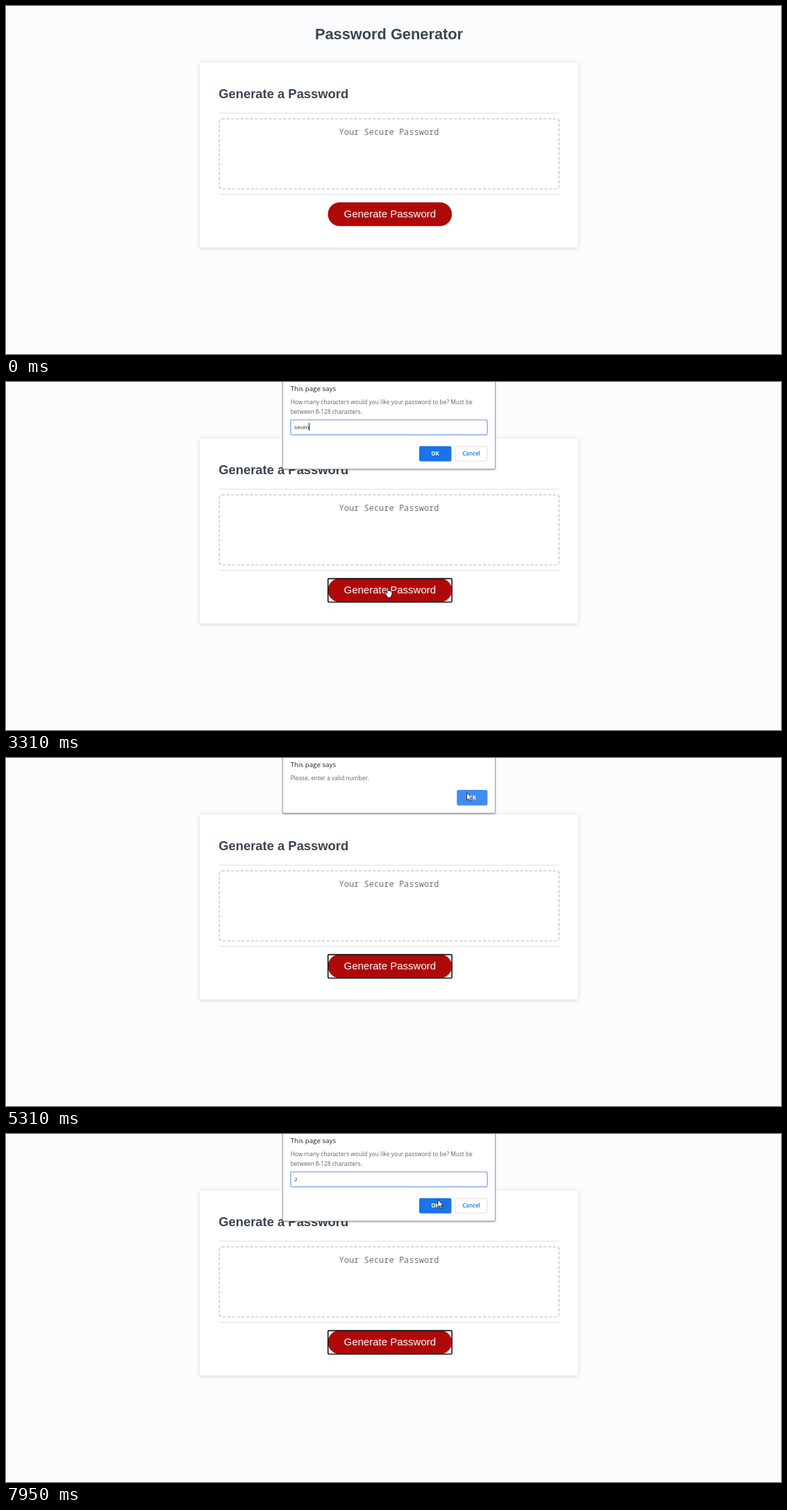
An HTML page that plays this animation: 1116x502 px, repeating every 8 s.

```html
<!DOCTYPE html>
<html lang="en">
<head>
<meta charset="utf-8">
<title>Password Generator</title>
<style>
  html, body { margin: 0; width: 100%; height: 100%; overflow: hidden; background: #fafcfe; }
  svg { display: block; width: 100%; height: 100%; }
  .page { font-family: "Liberation Sans", Arial, sans-serif; fill: #3b4550; }
  .page .head { font-weight: bold; }
  .dialog { font-family: "Open Sans", "Noto Sans", sans-serif; font-size: 8.4px; fill: #5f6368; }
  .dialog .title { font-size: 9.75px; fill: #202124; }
  .dialog .btn { font-size: 8px; font-weight: 600; text-anchor: middle; }
  .mid { text-anchor: middle; }
  .card { filter: drop-shadow(0 1.4px 2.7px rgba(0, 0, 0, .16)); }
  .panel { fill: #fff; stroke: #a4a7aa; filter: drop-shadow(0 1px 1.2px rgba(0, 0, 0, .35)); }
</style>
</head>
<body>
<svg viewBox="0 0 1116 502" xmlns="http://www.w3.org/2000/svg">
  <rect width="1116" height="502" fill="#fafcfe"/>
  <g class="page">
    <text class="head mid" x="551.5" y="47.8" font-size="21.8">Password Generator</text>
    <rect class="card" x="279" y="81.5" width="545" height="267" rx="3.4" fill="#fff"/>
    <text class="head" x="306.2" y="133.3" font-size="18.4">Generate a Password</text>
    <path d="M306.5 154.5H797M306.5 271.5H797" stroke="#e1e3e5" stroke-width="1.2"/>
    <rect x="307.1" y="162.9" width="489.2" height="101" rx="3.4" fill="none"
          stroke="#c3c5c7" stroke-width="1.4" stroke-dasharray="4.1 2.72"/>
    <text class="mid" x="551.5" y="186" font-size="12" fill="#757575"
          style="font-family:'Noto Sans Mono','DejaVu Sans Mono',monospace">Your Secure Password</text>
    <rect x="463.5" y="283.2" width="178.6" height="34.4" rx="17.2" fill="#af0808"/>
    <text class="mid" x="552.8" y="305.2" font-size="15" fill="#fff">Generate Password</text>
  </g>
  <rect id="ring" x="463.7" y="283.6" width="178.4" height="33.9" rx="1.5" fill="none" stroke="#101010" stroke-width="1.6"/>

  <g id="alert" class="dialog">
    <rect class="panel" x="398.5" y="-40" width="306" height="119.5" rx="1.5"/>
    <text class="title" x="409.7" y="13">This page says</text>
    <text x="409.7" y="32">Please, enter a valid number.</text>
    <rect x="649.2" y="46" width="44.2" height="22.4" rx="2.4" fill="#428cf0"/>
    <text class="btn" x="671.2" y="60" fill="#fff" style="font-weight:700">OK</text>
  </g>

  <g id="prompt" class="dialog">
    <rect class="panel" x="398.5" y="-40" width="306" height="165.5" rx="1.5"/>
    <text class="title" x="409.7" y="13">This page says</text>
    <text x="409.7" y="32">How many characters would you like your password to be? Must be</text>
    <text x="409.7" y="45.5">between 8-128 characters.</text>
    <rect x="409.9" y="54.6" width="283.2" height="21.6" rx="1.6" fill="#fff" stroke="#80abec" stroke-width="1.4"/>
    <text id="entry" x="415.2" y="68" style="font-size:7.9px;fill:#303134"></text>
    <rect id="caret" y="59" width="1" height="11" fill="#202124"/>
    <rect x="595" y="92.6" width="46.4" height="22" rx="2.4" fill="#1a73e8"/>
    <text class="btn" x="618" y="106.2" fill="#fff" style="font-weight:700">OK</text>
    <rect x="647" y="93" width="46" height="21.2" rx="2.4" fill="#fff" stroke="#dadce0"/>
    <text class="btn" x="670" y="106.2" fill="#1a73e8">Cancel</text>
  </g>

  <circle id="click" r="8.3" fill="#d99a00" fill-opacity=".82"/>
  <g id="pointer" stroke-linejoin="round" stroke-linecap="round">
    <path id="arrow" d="M0 0V10.6L2.5 8.4 4.3 12.6 6 11.9 4.2 7.8H7.5Z" fill="#fff" stroke="#111" stroke-width=".8"/>
    <path id="hand" d="M-.9 .9Q0-.7 .9 .9V4.8Q1.9 4 2.7 5.1 3.8 4.4 4.5 5.5 6 4.9 6.3 6.7V9.5Q6.2 11.6 4.9 12.7V14.7H-.4V13.2Q-2.8 10.6-3.7 8.3-3.5 6.5-2 7.4L-.9 8.7Z" fill="#fff" stroke="#111" stroke-width=".9"/>
    <path id="beam" d="M-2-5.5H-.6L0-5 .6-5.5H2M0-5V5M-2 5.5H-.6L0 5 .6 5.5H2" fill="none" stroke="#333" stroke-width="1"/>
  </g>
</svg>
<script>
const LOOP = 8000;
const el = {};
for (const node of document.querySelectorAll('[id]')) el[node.id] = node;

// [start ms, opacity, lift]
const poses = {
  prompt: [[0, 0, 0], [1370, .12, 1.2], [1450, .4, .9], [1540, .8, .4], [1620, 1, 0],
    [3850, .8, .9], [3940, .25, 1.2], [4020, 0, 0],
    [5890, .35, 1], [6010, .85, .3], [6060, 1, 0]],
  alert: [[0, 0, 0], [3850, .35, 1], [3940, .85, .3], [4020, 1, 0],
    [5815, .95, .4], [5890, .8, .95], [6010, .25, 1.2], [6060, 0, 0]]
};
// [start ms, typed text, caret visible]
const typing = [[0, '', 1], [1940, '', 0], [2460, 's', 1], [2700, 'se', 1], [2940, 'sev', 1],
  [3090, 'seve', 1], [3310, 'seven', 1], [5000, '', 1], [6290, '', 0], [6820, '', 1],
  [6990, '2', 1], [7520, '2', 0]];

const current = (list, t) => list.filter(k => k[0] <= t).pop();
const within = (t, a, b) => t >= a && t < b;
const show = (node, on) => node.setAttribute('visibility', on ? 'visible' : 'hidden');
const place = (node, [x, y]) => node.setAttribute('transform', `translate(${x} ${y})`);
const smooth = p => p * p * (3 - 2 * p);

// Progress in equal held steps between two times.
function stepped(t, from, to, gaps, first) {
  const k = Math.floor((t - from) / (to - from) * gaps + 1e-6) + first;
  return Math.max(0, Math.min(1, k / (gaps + first)));
}

function curve(p, a, b, c) {
  const q = 1 - p;
  return [0, 1].map(i => q * q * a[i] + 2 * p * q * b[i] + p * p * c[i]);
}

function pointerAt(t) {
  if (t < 4650) {
    const pos = curve(smooth(stepped(t, 290, 770, 6, 0)), [1041, 483], [790, 340], [549.5, 296.3]);
    return { pos, kind: pos[0] < 642 && pos[1] < 318 ? 'hand' : 'arrow' };
  }
  if (t < 5890) {
    const p = smooth(stepped(t, 4650, 5440, 10, 1));
    return { pos: curve(p, [549.5, 296.3], [640, -12], [669, 60]), kind: 'arrow' };
  }
  const p = t < 7606 ? 0 : smooth(stepped(t, 7606, 7950, 4, 1));
  const pos = curve(p, [669, 60], [640, 117], [622, 95]);
  return { pos, kind: pos[1] < 76 ? 'beam' : 'arrow' };
}

function setDialog(name, t) {
  const [, alpha, lift] = current(poses[name], t);
  const s = 1 + .012 * lift;
  show(el[name], alpha > 0);
  el[name].setAttribute('opacity', alpha);
  el[name].setAttribute('transform', `translate(${551.5 * (1 - s)} ${-7.4 * lift}) scale(${s})`);
  return alpha > 0;
}

function render(t) {
  setDialog('alert', t);
  const open = setDialog('prompt', t);
  const [, text, caret] = current(typing, t);
  if (el.entry.textContent !== text) el.entry.textContent = text;
  const width = text ? el.entry.getComputedTextLength() : 0;
  el.caret.setAttribute('x', Math.round(415 + width - .2));
  show(el.caret, open && caret);
  show(el.ring, t >= 1230);

  const { pos, kind } = pointerAt(t);
  place(el.pointer, pos);
  for (const k of ['arrow', 'hand', 'beam']) show(el[k], t >= 290 && k === kind);
  place(el.click, t < 4000 ? [548.7, 295.7] : [669, 60]);
  show(el.click, within(t, 1120, 1450) || within(t, 5660, 5890));
}

const start = performance.now();
function tick() {
  render((performance.now() - start) % LOOP);
  requestAnimationFrame(tick);
}
tick();
</script>
</body>
</html>
```
